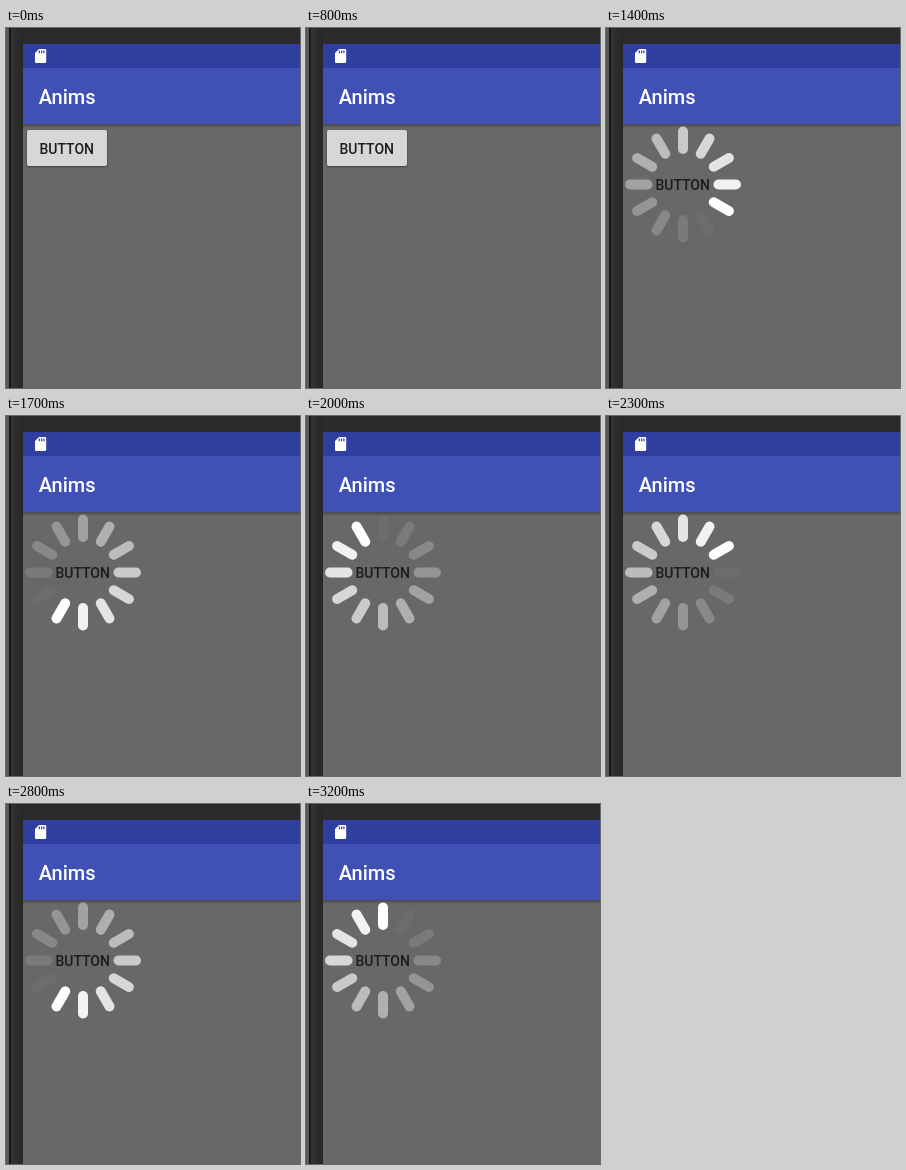
Write an HTML page that moves like this. It is 294 px wide and 360 px high and loops after 3300 ms.

```html
<!DOCTYPE html>
<html lang="en">
<head>
<meta charset="utf-8">
<title>Button spinner</title>
<style>
  html, body { margin: 0; width: 100%; height: 100%; overflow: hidden; background: #2b2b2b; }
  svg { display: block; width: 100%; height: 100%; }
  text { font-family: Roboto, sans-serif; font-weight: 500; }
</style>
</head>
<body>
<svg viewBox="0 0 294 360" xmlns="http://www.w3.org/2000/svg">
  <defs>
    <linearGradient id="bezel">
      <stop offset="0" stop-color="#353535"/>
      <stop offset=".4" stop-color="#2d2d2d"/>
      <stop offset="1" stop-color="#272727"/>
    </linearGradient>
    <linearGradient id="drop" x2="0" y2="1">
      <stop offset="0" stop-color="#000" stop-opacity=".3"/>
      <stop offset="1" stop-color="#000" stop-opacity="0"/>
    </linearGradient>
    <filter id="soft" x="-20%" y="-20%" width="140%" height="140%">
      <feGaussianBlur stdDeviation="1"/>
    </filter>
    <filter id="edge" filterUnits="userSpaceOnUse" x="-65" y="-65" width="130" height="130">
      <feGaussianBlur stdDeviation=".5"/>
    </filter>
  </defs>

  <!-- device frame -->
  <rect width="294" height="360" fill="#2b2b2b"/>
  <rect width="3" height="360" fill="#585858"/>
  <rect x="3" width="2" height="360" fill="#171717"/>
  <rect x="5" width="12" height="360" fill="url(#bezel)"/>

  <!-- screen -->
  <rect x="17" y="96" width="277" height="264" fill="#696767"/>
  <rect x="17" y="96" width="277" height="4" fill="url(#drop)"/>
  <rect x="17" y="16" width="277" height="24" fill="#303f9f"/>
  <rect x="17" y="40" width="277" height="56" fill="#3f51b5"/>
  <path d="M33 21h6q1.2 0 1.2 1.2v11.6q0 1.2-1.2 1.2h-8.8q-1.2 0-1.2-1.2V25z" fill="#fff"/>
  <path d="M33.3 22.5v2.8M35.6 22.5v2.8M37.9 22.5v2.8" stroke="#303f9f" stroke-width="1.2"/>
  <text x="32.7" y="76" font-size="20" fill="#fff">Anims</text>

  <g id="button">
    <rect x="21" y="103" width="80" height="36" rx="2" fill="#000" opacity=".4" filter="url(#soft)"/>
    <rect id="face" x="21" y="102" width="80" height="36" rx="2" fill="#d6d7d7"/>
  </g>
  <g id="spinner" transform="translate(77 156.5)" stroke="#fff" stroke-width="10" stroke-linecap="round" filter="url(#edge)"/>
  <text id="label" font-size="14" text-anchor="middle" fill="#1c1c1c">BUTTON</text>
</svg>
<script>
  const LOOP = 3300, TICK = 100, PRESS = 900, SPIN = 1000, SPOKES = 12;
  const STEPS_PER_MS = 0.011;
  const $ = id => document.getElementById(id);
  const button = $('button'), face = $('face'), spinner = $('spinner'), label = $('label');

  const spokes = Array.from({ length: SPOKES }, (_, i) => {
    const line = document.createElementNS('http://www.w3.org/2000/svg', 'line');
    line.setAttribute('y1', -35.5);
    line.setAttribute('y2', -53);
    line.setAttribute('transform', `rotate(${i * 360 / SPOKES})`);
    return spinner.appendChild(line);
  });

  function draw(time) {
    const t = Math.floor(time % LOOP / TICK) * TICK;
    const spinning = t >= SPIN;
    button.style.display = spinning ? 'none' : '';
    spinner.style.display = spinning ? '' : 'none';
    face.setAttribute('fill', t >= PRESS ? '#cccdcd' : '#d6d7d7');
    label.setAttribute('x', spinning ? 76.7 : 60.8);
    label.setAttribute('y', spinning ? 161.5 : 125.5);
    if (!spinning) return;

    const head = Math.floor((t - SPIN) * STEPS_PER_MS + 0.05);
    spokes.forEach((spoke, i) => {
      const age = ((head - i) % SPOKES + SPOKES) % SPOKES;
      spoke.setAttribute('stroke-opacity', 1 - age / 11.4);
    });
  }

  const start = performance.now();
  function frame() {
    draw(performance.now() - start);
    requestAnimationFrame(frame);
  }
  frame();
</script>
</body>
</html>
```
